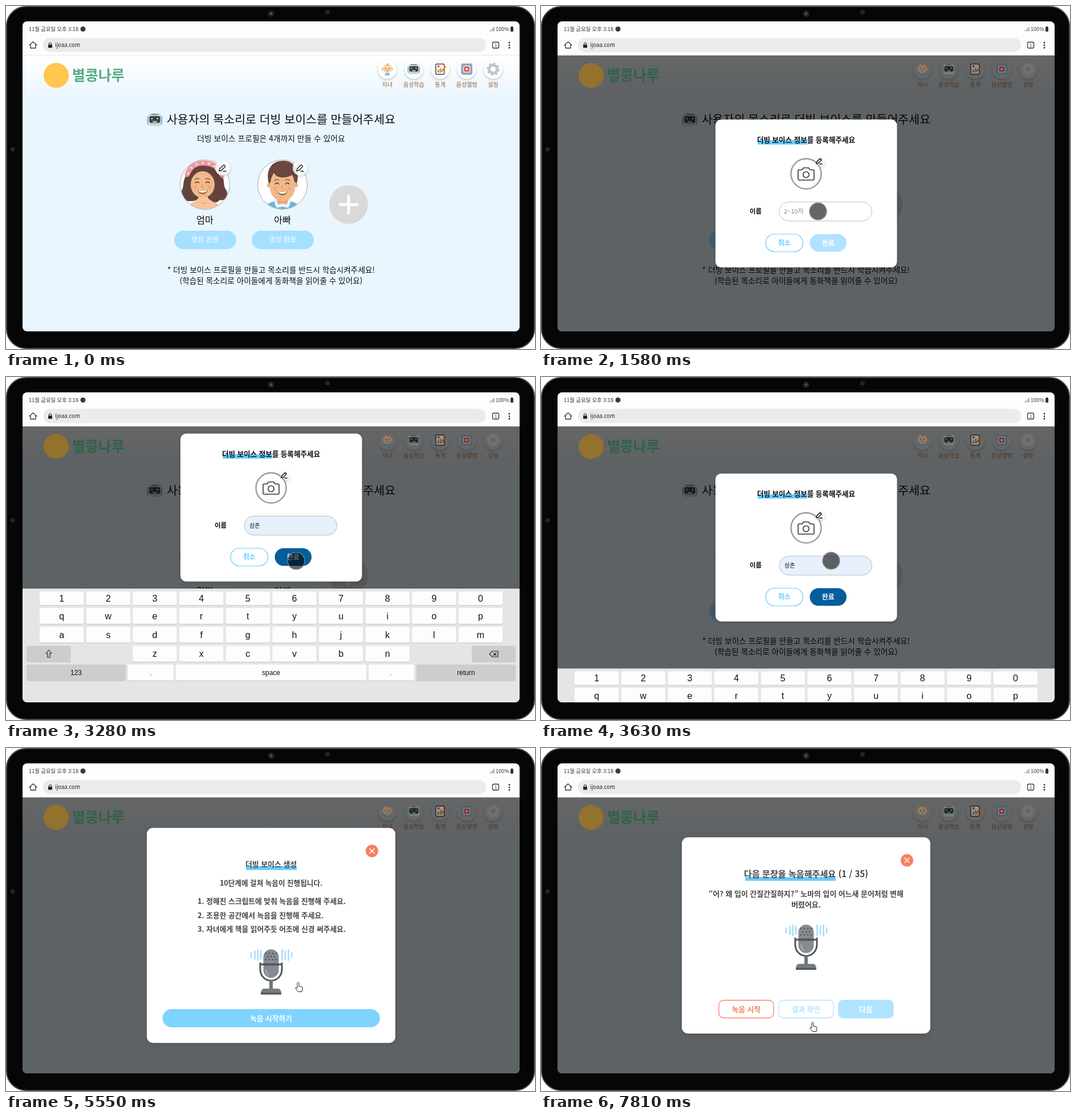
An HTML page for the animation above (8 s loop, 928x603 px).

```html
<!DOCTYPE html>
<html lang="ko">
<head>
<meta charset="utf-8">
<title>더빙 보이스</title>
<style>
html, body { margin: 0; height: 100%; overflow: hidden; background: #fff; }
svg { display: block; width: 100vw; height: 100vh; font-family: 'Noto Sans CJK KR', 'Noto Sans CJK JP', 'Noto Sans CJK', sans-serif; }
.latin { font-family: 'Liberation Sans', sans-serif; }
.soft { filter: drop-shadow(0 2px 2px rgba(0,0,0,.2)); }
.card { filter: drop-shadow(0 2px 3px rgba(0,0,0,.14)); }
.key { filter: drop-shadow(0 1px 0 rgba(0,0,0,.14)); }
</style>
</head>
<body>
<svg id="stage" viewBox="0 0 928 603" preserveAspectRatio="none"></svg>
<script>
const SKY = '#66cbff', PALE = '#b0e3ff', INK = '#0c0e14', GREY = '#444446', CORAL = '#f8805f';

// Markup helpers; text is placed by its vertical centre
const rect = (x, y, w, h, r, fill, more = '') =>
  `<rect x="${x}" y="${y}" width="${w}" height="${h}" rx="${r}" fill="${fill}" ${more}/>`;
const dot = (x, y, r, fill, more = '') => `<circle cx="${x}" cy="${y}" r="${r}" fill="${fill}" ${more}/>`;
const line = (d, stroke, w, more = '') =>
  `<path d="${d}" fill="none" stroke="${stroke}" stroke-width="${w}" stroke-linecap="round" stroke-linejoin="round" ${more}/>`;
const shape = (d, fill, more = '') => `<path d="${d}" fill="${fill}" ${more}/>`;
const text = (s, x, y, size, fill = INK, more = '') =>
  `<text x="${x}" y="${y + size * .36}" font-size="${size}" fill="${fill}" ${more}>${s}</text>`;
const mid = (s, x, y, size, fill, more = '') => text(s, x, y, size, fill, 'text-anchor="middle" ' + more);
const bold = (s, x, y, size, fill) => mid(s, x, y, size, fill, 'font-weight="700"');
const group = (id, body, more = '') => `<g id="${id}" ${more}>${body}</g>`;
const at = (x, y, body, scale = 1) => `<g transform="translate(${x} ${y}) scale(${scale})">${body}</g>`;

const pencil = line('M-6 5L-5 1L1-5Q3-6 4-4Q5-3 4-2L-2 4ZM1 5.5H6', '#222', 1.4);
const badge = (x, y, r) => dot(x, y, r, '#fff', 'class="soft" fill-opacity=".85"') + at(x, y, pencil, r / 13);

const robot =
  rect(-13.5, -7, 27, 16, 4, '#8db9d6') + rect(-11, -11, 22, 22, 4, '#cfd8dc') +
  rect(-6, -11, 12, 2.5, 1, '#8d979c') + rect(-9.500, -6.500, 19, 12, 3, '#3b4043') +
  dot(-5, -2, 1.3, '#e4f2e8') + dot(5, -2, 1.3, '#e4f2e8') + shape('M-4 2H4Q4 7 0 7Q-4 7-4 2Z', '#7cc694');

const smile =
  line('M-14-4Q-10.500-8-7.500-4M4.500-4Q8-8 11-4', '#53352f', 1.4) +
  line('M-15-10Q-11-13-7-11M4-11Q8-13 12-10', '#6d4941', 1.2) +
  line('M-2-1Q-4 4 0 4', '#cf8a5c', 1.2) +
  dot(-14, 4, 3.2, '#ec9478', 'opacity=".5"') + dot(11, 4, 3.2, '#ec9478', 'opacity=".5"') +
  shape('M-10 8Q-1 11 8 8Q6 16-1 16Q-8 16-10 8Z', '#a8683f') +
  shape('M-9 8.500Q-1 11 7 8.500Q5 13-1 13Q-7 13-9 8.500Z', '#fff');

const mother =
  shape('M-30-20C-40-8-36 0-40 9C-45 20-36 30-27 29C-16 30-10 24-4 22C10 34 20 34 26 27C36 30 43 18 37 9C31 2 36-8 28-20C18-44-20-46-30-20Z', '#64433f') +
  shape('M-36 46C-32 31-12 32-10 19H4C5 32 28 30 34 46Z', '#f9c49c') +
  '<ellipse cx="-4" cy="0" rx="21" ry="23.500" fill="#f1b98a"/>' +
  shape('M-26 4C-26-12-18-24-4-29C10-26 18-12 19 4C26-16 18-36-4-36C-26-36-33-16-26 4Z', '#64433f') +
  line('M-31-18Q-24-38-3-38Q21-38 30-17', '#ef9ba3', 9) +
  line('M-29-20Q-22-38-3-38Q19-38 28-19', '#fff', 3.2, 'stroke-dasharray="0 11"') +
  at(-3, 1, smile) + line('M-6 32Q-2 35 2 32', '#dc9169', 1);

const father =
  shape('M-36 46C-32 31-14 32-10 25H10C14 32 32 31 36 46Z', '#6bb5da') +
  shape('M-11 18H11V31L0 40L-11 31Z', '#e5a878') +
  line('M-13 27L-9 38L0 36L9 38L13 27', '#e9f6fd', 5) +
  dot(-23, 1, 4, '#e9b082') + dot(23, 1, 4, '#e9b082') +
  shape('M-22-18H22V6C21 22 9 29 0 29C-9 29-21 22-22 6Z', '#f1b98a') +
  shape('M-24-2C-30-24-20-42 1-42C22-43 31-22 25-2L21-5C20-10 19-13 17-17C5-10-9-11-15-20Q-20-14-21-4Z', '#6b4740') +
  at(1, 3, smile);

const profile = (x, body, name) =>
  dot(x, 314, 43.5, '#fff') + `<g clip-path="url(#round)" transform="translate(${x} 314)">${body}</g>` +
  dot(x, 314, 43.5, 'none', 'stroke="#a9a9a9"') + badge(x + 31, 285, 13) + mid(name, x, 376, 16.3) +
  rect(x - 54, 395, 109, 32.5, 16, '#a5e0ff') + mid('생성 완료', x, 411, 12.4, '#fff', 'font-weight="500"');

// Header
const icons = [
  dot(-8, 0, 2.3, '#f1b98e') + dot(8, 0, 2.3, '#f1b98e') + dot(0, -1, 8, '#fad2ad') + dot(-3, -1, .9, '#555') + dot(3, -1, .9, '#555') +
    line('M-1.500 2.500Q0 4 1.500 2.500', '#c4574a', 1) + line('M0-10Q3-9 0-7', '#c08a58', 1.2) + rect(-4.500, 7, 9, 4, 2, '#72c1e8'),
  at(0, 0, robot, .82),
  rect(-8, -9, 15, 18, 2, '#fff', 'stroke="#444" stroke-width="1.5"') + rect(-5, 1, 3, 5, 0, '#62b58f') +
    rect(-1, -2, 3, 8, 0, '#f2a33c') + line('M2 4L9-4', '#f08a3c', 3) + dot(-3, -5, 2, '#e8564f'),
  rect(-10, -10, 20, 20, 4, '#8fa9c0') + rect(-6, -6, 12, 12, 2, '#f6e9e4') + rect(-4.500, -4.500, 9, 9, 1, '#d9534c') + dot(0, 0, 2, '#fff'),
  dot(0, 0, 7, 'none', 'stroke="#bfc6cd" stroke-width="5"') +
    dot(0, 0, 10, 'none', 'stroke="#bfc6cd" stroke-width="3" stroke-dasharray="4 3.85"')
];
const labels = ['자녀', '음성학습', '통계', '음성앨범', '설정'];
const iconX = i => 669 + i * 46.4;
const discs = icons.map((_, i) => dot(iconX(i), 112, 16, '#fff', 'class="soft"')).join('');
const header =
  dot(88, 122, 22, '#ffc650') + text('별콩나루', 116, 122, 25, '#55ac80', 'font-weight="700"') +
  icons.map((icon, i) => at(iconX(i), 111, icon) + mid(labels[i], iconX(i), 138, 10, '#98623a', 'font-weight="500"')).join('');

const MEDIUM = 'font-weight="500"';
const page =
  rect(29, 87, 872, 485, 0, 'url(#sky)') + discs + group('head', header) + at(261, 200, robot) +
  mid('사용자의 목소리로 더빙 보이스를 만들어주세요', 482.5, 200, 20.55, INK, MEDIUM) +
  mid('더빙 보이스 프로필은 4개까지 만들 수 있어요', 465, 233, 13.8, INK, MEDIUM) +
  profile(349, mother, '엄마') + profile(485, father, '아빠') +
  dot(601, 349, 34, '#d9d9d9') + line('M586 349H616M601 334V364', '#fff', 5) +
  mid('* 더빙 보이스 프로필을 만들고 목소리를 반드시 학습시켜주세요!', 465, 464, 13.65, INK, MEDIUM) +
  mid('(학습된 목소리로 아이들에게 동화책을 읽어줄 수 있어요)', 465, 483, 13.65, INK, MEDIUM);

const browser =
  rect(29, 27, 872, 60, 0, '#fdfdfd') + rect(29, 86, 872, 1, 0, '#e6e8e9') +
  text('11월 금요일 오후 3:18', 40, 40.5, 9.25, '#333') + dot(135, 40.5, 4.5, '#3a3a3a') +
  line('M849 44V43M851.5 44V41M854 44V39M856 44V37', '#888', 1.2) + text('100%', 859, 40.5, 9.1, '#333') +
  rect(885, 37, 5, 8, 1, '#333') + rect(886, 36, 3, 2, 0, '#333') +
  line('M41 69L47.5 63L54 69M43 68V74H52V68', '#333', 1.3) +
  rect(65, 56, 777, 25, 12.5, '#ebebeb') + rect(74, 68, 7, 5.5, 1, '#222') + line('M75.5 68V66Q77.5 63 79.5 66V68', '#222', 1.2) +
  text('ijoaa.com', 86, 69, 9.6, '#222') + rect(853.5, 63.5, 11, 10.5, 2, 'none', 'stroke="#333" stroke-width="1.3"') +
  mid('1', 859, 69, 7.5, '#333') + [64.5, 69, 73.5].map(y => dot(883, y, 1.4, '#333')).join('');

// Dialogs
const pill = (x, y, w, label, fill, ink, more = '') =>
  rect(x, y, w, 31, 15.5, fill, more) + bold(label, x + w / 2, y + 15.5, 12, ink);
const form =
  rect(306, 199.5, 318.5, 260, 10, '#fff', 'class="card"') + rect(380, 236, 87, 7.5, 0, SKY) +
  bold('더빙 보이스 정보를 등록해주세요', 465, 235.5, 12.55) +
  badge(488, 273, 10) + dot(465, 295, 26.5, '#fff', 'stroke="#999" stroke-width="2.4"') + at(488, 273, pencil, .9) +
  line('M453 288H458L460.5 284.5H469.5L472 288H477Q479 288 479 290V304Q479 306 477 306H453Q451 306 451 304V290Q451 288 453 288Z', '#333', 1.6) +
  dot(465, 296.5, 5.2, 'none', 'stroke="#333" stroke-width="1.6"') +
  bold('이름', 376.5, 361, 11.5) + rect(418, 344.5, 162.5, 33.5, 16.75, '#fff', 'id="field" stroke="#b9bcc0"') +
  group('hint', text('2~10자', 426, 361, 11, '#8b8f94')) +
  group('preview', text('삼촌', 427, 361, 9, '#555')) + group('caret', rect(426, 354, 1, 13, 0, '#222')) +
  group('value', text('삼촌', 427, 361, 10)) +
  pill(394, 401, 65.5, '취소', '#fff', SKY, `stroke="${SKY}" stroke-width="1.2"`) +
  pill(471.5, 401, 64.5, '완료', PALE, '#fff', 'id="done"');

const toe = (x, y, turn) =>
  `<ellipse rx="6.2" ry="8.8" transform="translate(${x} ${y}) rotate(${turn})" fill="none" stroke="#cbd1d1" stroke-width="2.8"/>`;
const loading =
  rect(367, 248, 196, 163.5, 10, '#fff', 'class="card"') + toe(440.5, 327, -22) + toe(455.5, 312.5, -6) + toe(470.5, 315, 16) + toe(483.5, 327.5, 38) +
  line('M461 326C468 326 471 332 476 336C483 342 480 351 472 350C465 348 457 346 451 348C443 349 440 341 446 336C452 331 453 326 461 326Z', '#cbd1d1', 2.8);

const holes = [0, 1, 2].map(r => [0, 1, 2, 3].slice(r % 2).map(c => dot(456 + c * 6 - r % 2 * 3, 361 + r * 5.5, 1.3, '#4e5559')).join('')).join('');
const bars = [[430, 4], [436.5, 7], [442, 9], [447, 7], [484.5, 9], [490, 7], [495.5, 9], [501, 4]]
  .map(([x, h]) => line(`M${x} ${364 - h}V${364 + h}`, '#a3daf8', 2.4)).join('');
const mic =
  bars + rect(451.5, 354, 27, 50, 13.5, '#858b90') + holes + rect(451.5, 378, 27, 5, 0, '#6d7478') +
  line('M446 378V389C446 401 455 409 465 409C475 409 484 401 484 389V378M446 380.5H484', '#51585c', 3) +
  line('M456 390Q457 396 461 399', '#a8aeb2', 2) + rect(462, 409, 6, 15, 0, '#6f767a') +
  shape('M452 423H478Q483 424 483 433H447Q447 424 452 423Z', '#757c80') + rect(447, 430, 36, 3.5, 1, '#555c60');
const close = y => dot(642, y, 11, CORAL) + line(`M638 ${y - 4}l8 8m0-8l-8 8`, '#fff', 1.7);
const steps = ['정해진 스크립트에 맞춰 녹음을 진행해 주세요.', '조용한 공간에서 녹음을 진행해 주세요.', '자녀에게 책을 읽어주듯 어조에 신경 써주세요.'];
const guide =
  rect(247, 140.5, 436, 378, 11, '#fff', 'class="card"') + close(181) + rect(421, 207.5, 89, 7, 0, SKY) +
  bold('더빙 보이스 생성', 465, 204, 12.9, GREY) + bold('10단계에 걸쳐 녹음이 진행됩니다.', 465, 237, 12.6, GREY) +
  steps.map((s, i) => text(`${i + 1}. ${s}`, 336, 269.5 + i * 24.5, 12.75, GREY, 'font-weight="700"')).join('') + mic +
  rect(274.5, 459, 381.5, 32, 16, SKY, 'id="start"') + bold('녹음 시작하기', 465, 475, 12.7, '#fff');

const choice = (x, label, fill, edge, ink) =>
  rect(x, 443.5, 96, 31, 8, fill, `stroke="${edge}" stroke-width="1.3"`) + bold(label, x + 48, 459, 12.8, ink);
const record =
  rect(247, 157, 436, 345, 11, '#fff', 'class="card"') + close(197.5) + rect(358, 227, 159, 6.5, 0, SKY) +
  bold('다음 문장을 녹음해주세요 (1 / 35)', 465, 222, 15.1, GREY) +
  bold('“어? 왜 입이 간질간질하지?” 노마의 입이 어느새 문어처럼 변해', 465, 256.5, 12.9, GREY) +
  bold('버렸어요.', 465, 275, 12.9, GREY) + at(0, -43.5, mic) +
  choice(312, '녹음 시작', '#fff', CORAL, CORAL) + choice(417, '결과 확인', '#fff', PALE, PALE) + choice(522, '다음', PALE, PALE, '#fff');

// Keyboard
const key = (x, y, w, h, label, size = 16, fill = '#fdfdfd', ink = '#111') =>
  rect(x, y, w, h, 3, fill, 'class="key"') + mid(label, x + w / 2, y + h / 2, size, ink);
const DARK = '#cdcdcd';
const keyboard =
  rect(29, 372, 872, 200, 0, '#e5e5e5') +
  ['1234567890', 'qwertyuiop', 'asdfghjklm', '  zxcvbn'].map((row, r) => [...row].map((c, i) =>
    c === ' ' ? '' : key(59 + i * 81.64, [377, 406, 439, 472.5][r], 77.5, r ? 28 : 24, c)).join('')).join('') +
  key(36, 472.5, 77.5, 28, '', 0, DARK) + line('M75 480L70 486H73V493H77V486H80Z', '#222', 1.1) +
  key(817, 472.5, 77, 28, '', 0, DARK) + line('M848 487L853 482H863V492H853ZM855 485L860 489.5M860 485L855 489.5', '#222', 1.2) +
  [[36, 174, '123', DARK], [214, 80, ',', '#fdfdfd', '#2b8fe0'], [298, 334, 'space'], [636, 80, '.', '#fdfdfd', '#777'], [720, 174, 'return', DARK]]
    .map(([x, w, s, fill, ink]) => key(x, 505.5, w, 28, s, 12, fill, ink)).join('');
const popup =
  rect(479, 386, 144, 41.5, 6, '#f9fbf4', 'class="soft"') + rect(483, 390, 136.5, 33, 3, '#e9ede0') +
  text('삼촌', 491, 406.5, 11, '#333') + line('M599 402.5l8 8m0-8l-8 8', '#333', 1.5);

const cursors =
  group('touch', dot(0, 0, 15, '#000', 'fill-opacity=".6" stroke="#8a8a8a" stroke-opacity=".8" stroke-width="1.5"')) +
  group('arrow', shape('M0 0V14L3.2 11L5.5 16L7.6 15.2L5.4 10.2H10Z', '#fff', 'stroke="#222"')) +
  group('hand', shape('M-1 1.5C-1-.5 2-.5 2 1.5V7L7 8Q8.5 8.5 8.2 11L7 16.5H.5L-4.5 10Q-4 8-1 10Z', '#fff', 'stroke="#222"'));

const stage = document.getElementById('stage');
stage.innerHTML =
  `<defs><linearGradient id="sky" x2="0" y2="1"><stop stop-color="#fff"/><stop offset=".15" stop-color="#eaf6fe"/></linearGradient>
  <clipPath id="round"><circle r="43"/></clipPath><clipPath id="screen"><rect x="29" y="27" width="872" height="545" rx="8"/></clipPath></defs>` +
  rect(1, 1, 926, 601, 34, '#060606', 'stroke="#454545" stroke-width="2"') +
  dot(465, 13.5, 5.5, '#20222c') + dot(465, 13.5, 2.2, '#46507c') + dot(564, 11, 4, '#242424') + dot(11.5, 252, 4, '#242424') +
  `<g clip-path="url(#screen)">` + page +
  group('shade', rect(29, 87, 872, 485, 0, '#000', 'opacity=".6"') + '<use href="#head" opacity=".3"/>') +
  group('form', form) + group('loading', loading) + group('guide', guide) + group('record', record) +
  browser + group('keyboard', keyboard, 'class="latin"') + group('popup', popup) + cursors + '</g>';

// Motion
const el = id => document.getElementById(id);
const ramp = (t, a, b) => Math.min(1, Math.max(0, (t - a) / (b - a)));
const show = (id, v) => el(id).setAttribute('opacity', +v);
const move = (id, x, y) => el(id).setAttribute('transform', `translate(${x} ${y})`);

// Pointer stops: time, x, y, kind from that time on
const path = [
  [260, 784, 480, 'touch'], [640, 571, 342, 'touch'], [900, 571, 342, 'touch'], [1500, 486, 361, 'touch'],
  [1760, 486, 361, 'touch'], [2000, 499, 390, 'arrow'], [2130, 500, 396, 'arrow'], [2340, 503, 403, 'arrow'],
  [2420, 503, 403, 'arrow'], [2470, 513, 408, 'arrow'], [2610, 513, 410, 'touch'], [2800, 513, 410, 'touch'],
  [3300, 509, 323, 'touch'], [3920, 509, 323, 'touch'], [4240, 512, 412, 'touch'], [4330, 512, 412, 'hand'],
  [6100, 512, 412, 'hand'], [6520, 476, 484, 'hand'], [6760, 476, 484, 'hand'], [6880, 476, 482, 'hand']
];

function movePointer(t) {
  const i = path.findLastIndex(p => p[0] <= t);
  for (const kind of ['touch', 'arrow', 'hand']) show(kind, i >= 0 && path[i][3] === kind);
  if (i < 0) return;
  const a = path[i], b = path[i + 1] || a;
  const p = a === b ? 0 : ramp(t, a[0], b[0]), k = p * p * (3 - 2 * p);
  move(a[3], a[1] + (b[1] - a[1]) * k, a[2] + (b[2] - a[2]) * k);
}

function draw(now) {
  const t = now % 8000;
  const lift = ramp(t, 1600, 1980) - ramp(t, 3350, 3750);
  const preview = t >= 2050 && t < 2610, filled = t >= 2610;

  show('shade', ramp(t, 800, 1080));
  show('form', ramp(t, 800, 1080) - ramp(t, 4300, 4500));
  move('form', 0, -100 * lift);
  move('keyboard', 0, 200 * (1 - lift));
  show('popup', t >= 1980 && t < 2610);
  show('hint', t < 2050);
  show('preview', preview);
  show('caret', t >= 1650 && t < 2610);
  show('value', filled);
  el('field').setAttribute('fill', preview || filled ? '#e7f0fd' : '#fff');
  el('done').setAttribute('fill', filled ? '#045e9c' : PALE);

  show('loading', ramp(t, 4300, 4520) - ramp(t, 5140, 5340));
  show('guide', ramp(t, 5120, 5400) - ramp(t, 7600, 7780));
  el('start').setAttribute('fill', t < 6480 ? '#7fd3ff' : SKY);
  show('record', ramp(t, 7580, 7780));
  movePointer(t);
}

const begin = performance.now();
(function tick() {
  draw(performance.now() - begin);
  requestAnimationFrame(tick);
})();
</script>
</body>
</html>
```
